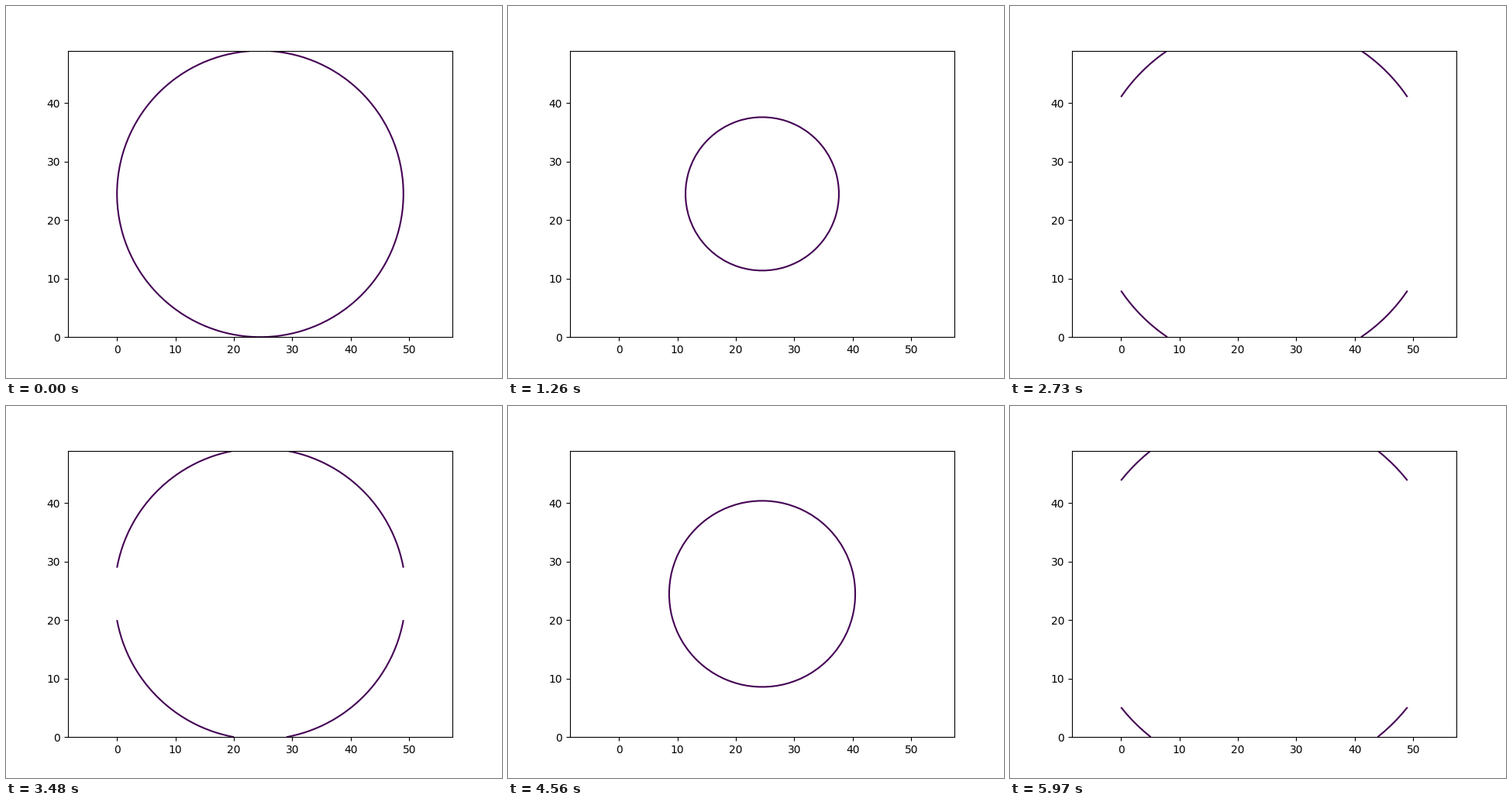
A matplotlib script for the animation above (6000 ms loop, 640x480 px).

```python
import numpy as np
import matplotlib.pyplot as plt
from matplotlib.animation import FuncAnimation

FRAMES = 200
INTERVAL = 30
GRID = 50
STEP = 0.01697   # drop of the squared radius per frame
SPAN = 2.002     # squared radius at which the ring re-enters

axis = np.linspace(-1, 1, GRID)
x, y = np.meshgrid(axis, axis)
field = x**2 + y**2

fig, ax = plt.subplots(figsize=(6.4, 4.8), dpi=100)
mid = (GRID - 1) / 2
half_width = mid * 496 / 369.6   # equal scale on both axes
ax.set_xlim(mid - half_width, mid + half_width)
ax.set_ylim(0, GRID - 1)


def draw(i):
    for ring in list(ax.collections):
        ring.remove()
    level = (1 - STEP * i) % SPAN
    if level < field.max():
        ax.contour(field, levels=[level], colors="#440154", linewidths=1.5)
    return ax.collections


anim = FuncAnimation(fig, draw, frames=FRAMES, init_func=lambda: draw(0),
                     interval=INTERVAL, repeat=True, repeat_delay=0, blit=False)
plt.show()
```
